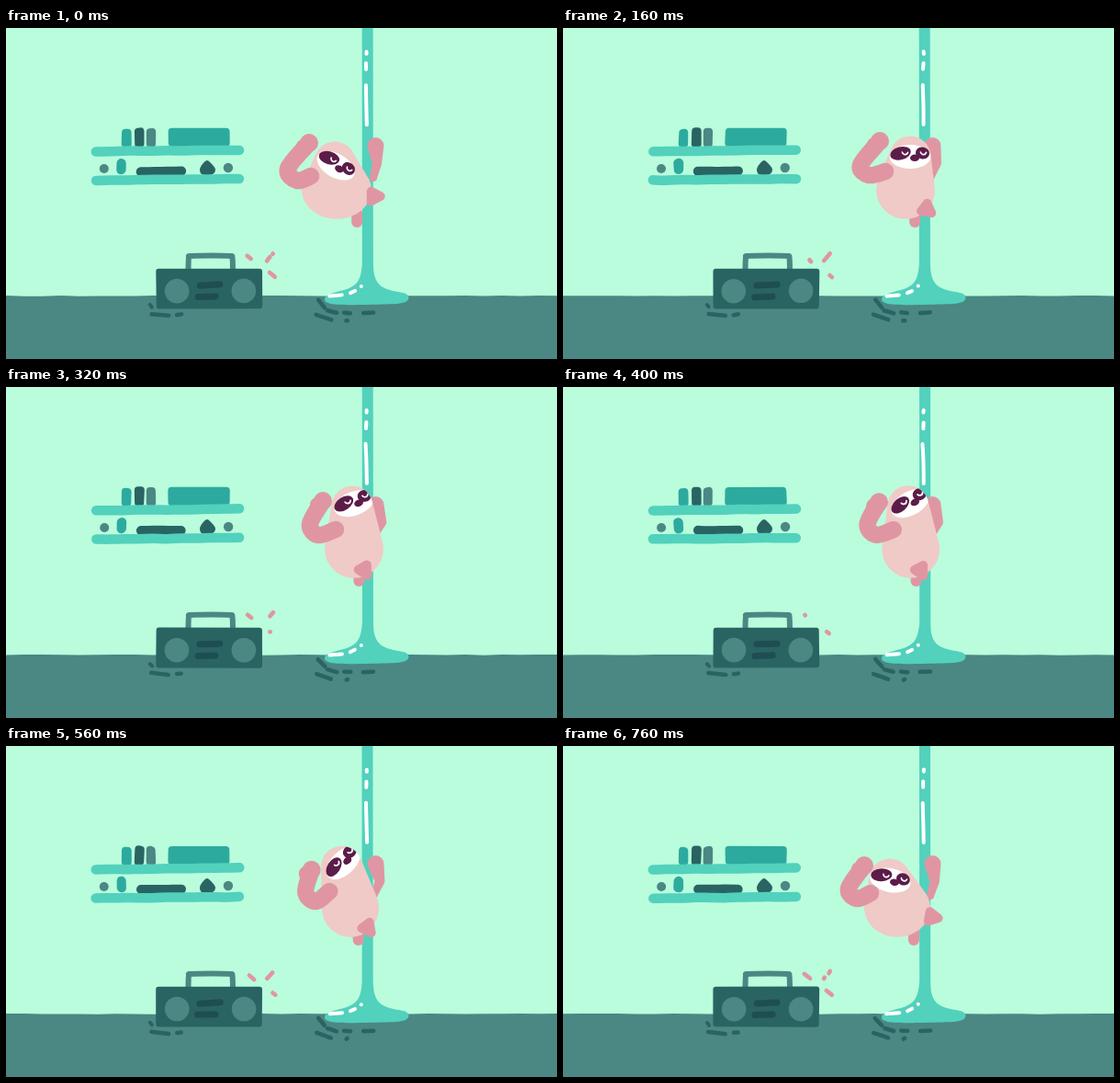
Animation of 600 by 360 pixels, one loop 800 ms. Source, as an HTML page with a canvas:

```html
<!DOCTYPE html>
<html lang="en">
<head>
<meta charset="utf-8">
<title>Pole dancing sloth</title>
<style>
html, body { margin: 0; width: 100%; height: 100%; overflow: hidden; background: #b9fddd; }
canvas { display: block; width: 600px; height: 360px; }
</style>
</head>
<body>
<canvas id="stage" width="600" height="360"></canvas>
<script>
const ctx = document.getElementById('stage').getContext('2d');
const LOOP = 800, STEP = 40, RAD = Math.PI / 180;
const C = {
  wall: '#b9fddd', floor: '#4b8783', mint: '#52d1bd', teal: '#2daa9e',
  dark: '#296463', slot: '#1e4e52', grey: '#4b8783',
  skin: '#f0cac6', limb: '#e096a2', plum: '#5b1c49', white: '#ffffff'
};

// time, head x y, belly x rx, nose x y, face angle, foot x y angle
const BODY = [
  [0,   358, 146, 360, 38, 363, 153,  30, 401, 183,  0],
  [80,  375, 144, 366, 35, 379, 150,  20, 400, 190, 35],
  [160, 378, 140, 373, 32, 383, 141,   0, 396, 197, 38],
  [320, 377, 130, 379, 32, 384, 126, -20, 390, 199, 60],
  [480, 373, 131, 377, 31, 380, 126, -35, 390, 199, 60],
  [640, 358, 133, 372, 32, 363, 126, -42, 398, 195, 40],
  [760, 356, 145, 364, 36, 361, 148,  12, 402, 186, 10]
];
// time, then hand, elbow, underside and end of the raised arm
const ARM = [
  [0,   330, 125, 307, 153, 317, 166, 332, 161],
  [80,  343, 121, 317, 149, 326, 161, 346, 157],
  [160, 345, 123, 324, 149, 333, 160, 351, 156],
  [320, 345, 124, 331, 149, 340, 161, 359, 155],
  [480, 341, 128, 330, 151, 340, 162, 358, 156],
  [640, 325, 140, 321, 165, 332, 175, 345, 160],
  [760, 328, 130, 311, 155, 320, 166, 335, 160]
];
// x1 y1 x2 y2 of each ray, then pulses: start, grow time, tail delay, tail time
const RAYS = [
  { line: [270, 254, 263, 248], pulses: [[120, 150, 120, 180], [440, 160, 300, 130]] },
  { line: [284, 253, 291, 245], pulses: [[740, 130, 320, 130], [450, 130, 120, 250]] },
  { line: [287, 266, 293, 271], pulses: [[290, 240, 160, 210], [610, 140, 210, 230]] }
];

const mix = (a, b, k) => a + (b - a) * k;
const clamp = v => Math.max(0, Math.min(1, v));

// Smooth periodic interpolation of a pose table
function pose(table, t) {
  const n = table.length;
  const row = i => table[(i + n) % n];
  const time = i => row(i)[0] + LOOP * Math.floor(i / n);
  let i = n - 1;
  while (table[i][0] > t) i--;
  const t0 = time(i), t1 = time(i + 1), h = t1 - t0, u = (t - t0) / h;
  return row(i).slice(1).map((_, c) => {
    const v = j => row(j)[c + 1];
    const m0 = (v(i + 1) - v(i - 1)) / (t1 - time(i - 1)) * h;
    const m1 = (v(i + 2) - v(i)) / (time(i + 2) - t0) * h;
    const a = v(i), b = v(i + 1), d = b - a;
    return a + u * (m0 + u * (3 * d - 2 * m0 - m1 + u * (m0 + m1 - 2 * d)));
  });
}

let seed = 1;
function rnd() {
  seed = (seed * 16807) % 2147483647;
  return seed / 2147483647 - 0.5;
}

// Smooth curve through points
function curve(pts, closed) {
  const n = pts.length;
  const at = i => closed ? pts[(i + n) % n] : pts[Math.max(0, Math.min(n - 1, i))];
  ctx.moveTo(pts[0][0], pts[0][1]);
  for (let i = 0; i < (closed ? n : n - 1); i++) {
    const [a, b, c, d] = [at(i - 1), at(i), at(i + 1), at(i + 2)];
    ctx.bezierCurveTo(b[0] + (c[0] - a[0]) / 6, b[1] + (c[1] - a[1]) / 6,
      c[0] - (d[0] - b[0]) / 6, c[1] - (d[1] - b[1]) / 6, c[0], c[1]);
  }
}

function stroke(color, width, pts) {
  ctx.beginPath();
  curve(pts);
  ctx.strokeStyle = color;
  ctx.lineWidth = width;
  ctx.stroke();
}

// Hand-drawn line with a trembling middle
function bar(color, w, x1, y1, x2, y2) {
  const n = Math.max(1, Math.round(Math.hypot(x2 - x1, y2 - y1) / 16));
  const pts = [];
  for (let i = 0; i <= n; i++) {
    pts.push([mix(x1, x2, i / n) + rnd() * 0.7, mix(y1, y2, i / n) + rnd() * 0.7]);
  }
  stroke(color, w, pts);
}

function oval(color, x, y, rx, ry = rx, a = 0) {
  ctx.beginPath();
  ctx.ellipse(x, y, rx, ry, a * RAD, 0, 7);
  ctx.fillStyle = color;
  ctx.fill();
}

// Rounded box with slightly uneven corners
function box(color, x1, y1, x2, y2, r) {
  const j = () => rnd() * 0.7;
  ctx.beginPath();
  ctx.moveTo(x1 + r + j(), y1 + r + j());
  ctx.lineTo(x2 - r + j(), y1 + r + j());
  ctx.lineTo(x2 - r + j(), y2 - r + j());
  ctx.lineTo(x1 + r + j(), y2 - r + j());
  ctx.closePath();
  ctx.fillStyle = ctx.strokeStyle = color;
  ctx.lineWidth = 2 * r;
  ctx.fill();
  ctx.stroke();
}

// Path swept by an ellipse [x, y, rx, ry] moving from a to b
function sweep(a, b) {
  for (let i = 0; i <= 40; i++) {
    const [x, y, rx, ry] = a.map((v, k) => mix(v, b[k], i / 40));
    ctx.moveTo(x + rx, y);
    ctx.ellipse(x, y, rx, ry, 0, 0, Math.PI * 2);
  }
}

function room() {
  ctx.fillStyle = C.wall;
  ctx.fillRect(0, 0, 600, 360);
  ctx.beginPath();
  ctx.moveTo(0, 360);
  for (let x = 0; x <= 600; x += 20) ctx.lineTo(x, 291.3 + rnd() * 0.8);
  ctx.lineTo(600, 360);
  ctx.fillStyle = C.floor;
  ctx.fill();
}

function shelves() {
  box(C.teal, 126, 110, 136.5, 130, 4);
  box(C.dark, 140, 108.5, 150.5, 130, 4);
  box(C.grey, 152.5, 109, 163, 130, 4);
  box(C.teal, 176.5, 109, 243.5, 129, 4);
  bar(C.mint, 10.5, 98, 134.3, 254, 132.6);
  oval(C.grey, 107 + rnd() * 0.5, 153, 5);
  box(C.teal, 120.5, 142, 131, 159, 5);
  bar(C.dark, 10, 147, 156, 191, 155.7);
  ctx.beginPath();
  curve([[219, 144], [225, 149], [228, 154], [225, 159], [214, 159.5], [211, 154], [214, 148]], true);
  ctx.fillStyle = C.dark;
  ctx.fill();
  oval(C.grey, 242 + rnd() * 0.5, 152, 5.2);
  bar(C.mint, 10.5, 98, 165.6, 254, 164);
}

function radio() {
  stroke(C.grey, 6, [[198.5, 264], [199, 250], [201.5, 248], [224, 247.5], [244, 248], [246.5, 250], [247, 264]]);
  box(C.dark, 163.5, 261.7, 279, 305.5, 3);
  oval(C.grey, 186 + rnd() * 0.5, 286 + rnd() * 0.5, 13.3);
  oval(C.grey, 259 + rnd() * 0.5, 286 + rnd() * 0.5, 13.3);
  bar(C.slot, 7, 211, 280, 233, 279);
  bar(C.slot, 7, 209, 292.5, 228, 292);
  bar(C.dark, 4, 157, 301, 159, 303.5);
  bar(C.dark, 4.5, 158.5, 311, 177, 313);
  bar(C.dark, 4.5, 186, 312, 191, 311.5);
}

function pole() {
  bar(C.dark, 4.5, 340, 296, 347, 304);
  bar(C.dark, 4.5, 350, 307, 360, 310);
  bar(C.dark, 4.5, 338, 312, 354, 317.5);
  bar(C.dark, 4.5, 368, 309.5, 375, 310);
  bar(C.dark, 4.5, 370.5, 318.5, 372, 318);
  bar(C.dark, 4.5, 389, 310, 400, 309.5);
  const j = rnd() * 0.6;
  ctx.beginPath();
  ctx.moveTo(387.8 + j, 0);
  ctx.lineTo(388 + j, 255);
  ctx.bezierCurveTo(387, 276, 381, 281, 368, 285);
  ctx.bezierCurveTo(356, 288, 347, 290, 347, 295);
  ctx.bezierCurveTo(347, 301, 360, 301.5, 392, 301);
  ctx.bezierCurveTo(425, 300, 438.5, 301, 438.5, 293);
  ctx.bezierCurveTo(438, 287, 428, 288, 418, 285);
  ctx.bezierCurveTo(404, 281, 400, 273, 400 + j, 255);
  ctx.lineTo(399.8 + j, 0);
  ctx.fillStyle = C.mint;
  ctx.fill();
  bar(C.white, 4, 392.8, 25.5, 392.8, 28);
  bar(C.white, 4, 392.3, 38.5, 392.2, 45);
  bar(C.white, 4, 391.8, 62, 392.8, 105);
  bar(C.white, 4, 352.5, 291.5, 366, 290.5);
  bar(C.white, 4, 375, 288.5, 380, 286);
  oval(C.white, 386.8, 281 + rnd(), 2);
}

function face(x, y, angle) {
  ctx.save();
  ctx.translate(x, y);
  ctx.rotate(angle * RAD);
  oval(C.white, -5, -1, 22.5, 13);
  oval(C.plum, -15.5, -4.7, 11.5, 7, -14);
  oval(C.plum, 8.5, -5, 7.6, 6.5, 14);
  oval(C.plum, 0, 0.3, 5, 3.7);
  ctx.strokeStyle = C.white;
  ctx.lineWidth = 1.7;
  for (const ex of [-10.5, 9.5]) {
    ctx.beginPath();
    ctx.arc(ex, -6.6, 3.2, 0.3, 2.9);
    ctx.stroke();
  }
  ctx.restore();
}

function sloth(t) {
  const [hx, hy, bx, rx, nx, ny, angle, fx, fy, fa] = pose(BODY, t);
  const arm = pose(ARM, t);

  // Holding arm
  const mid = [404 + (bx + rx - 398) * 0.4, 147, 5.2, 5.2];
  ctx.fillStyle = C.limb;
  ctx.beginPath();
  sweep([402.5, 128, 9, 9], mid);
  sweep(mid, [400, 163, 4, 4]);
  ctx.fill();

  // Lower leg
  const lx = 382 + (402 - fx) * 0.2;
  stroke(C.limb, 12, [[lx, 202], [lx, 211]]);

  // Body and face
  ctx.save();
  ctx.beginPath();
  sweep([bx, 176.3, rx, 31.5], [hx, hy, 22.5, 22.5]);
  ctx.fillStyle = C.skin;
  ctx.fill();
  ctx.clip();
  face(nx, ny, angle);
  ctx.restore();

  // Upper foot
  ctx.save();
  ctx.translate(fx, fy);
  ctx.rotate(fa * RAD);
  ctx.beginPath();
  ctx.moveTo(-3.5, -5.5);
  ctx.lineTo(7, 0);
  ctx.lineTo(-3.5, 5.5);
  ctx.closePath();
  ctx.fillStyle = ctx.strokeStyle = C.limb;
  ctx.lineWidth = 9.5;
  ctx.fill();
  ctx.stroke();
  ctx.restore();

  // Raised arm
  const pts = [0, 2, 4, 6].map(i => [arm[i], arm[i + 1]]);
  stroke(C.limb, 18.5, pts);
  oval(C.limb, arm[0], arm[1], 10);
  oval(C.limb, arm[0] - 6, arm[1] + 4, 8);
}

function sparks(t) {
  for (const { line: [x1, y1, x2, y2], pulses } of RAYS) {
    for (const [start, grow, delay, fade] of pulses) {
      const age = (t - start + LOOP) % LOOP;
      const head = clamp(age / grow), tail = clamp((age - delay) / fade);
      if (head <= 0 || tail >= 1) continue;
      bar(C.limb, 4.6, mix(x1, x2, tail), mix(y1, y2, tail), mix(x1, x2, head), mix(y1, y2, head));
    }
  }
}

function draw(now) {
  const step = Math.floor((now % LOOP) / STEP);
  const t = step * STEP;
  seed = 7919 * (step + 3);
  ctx.lineCap = ctx.lineJoin = 'round';
  room();
  shelves();
  radio();
  pole();
  sloth(t);
  sparks(t);
}

const begin = performance.now();
function tick() {
  draw(performance.now() - begin);
  requestAnimationFrame(tick);
}
tick();
</script>
</body>
</html>
```
